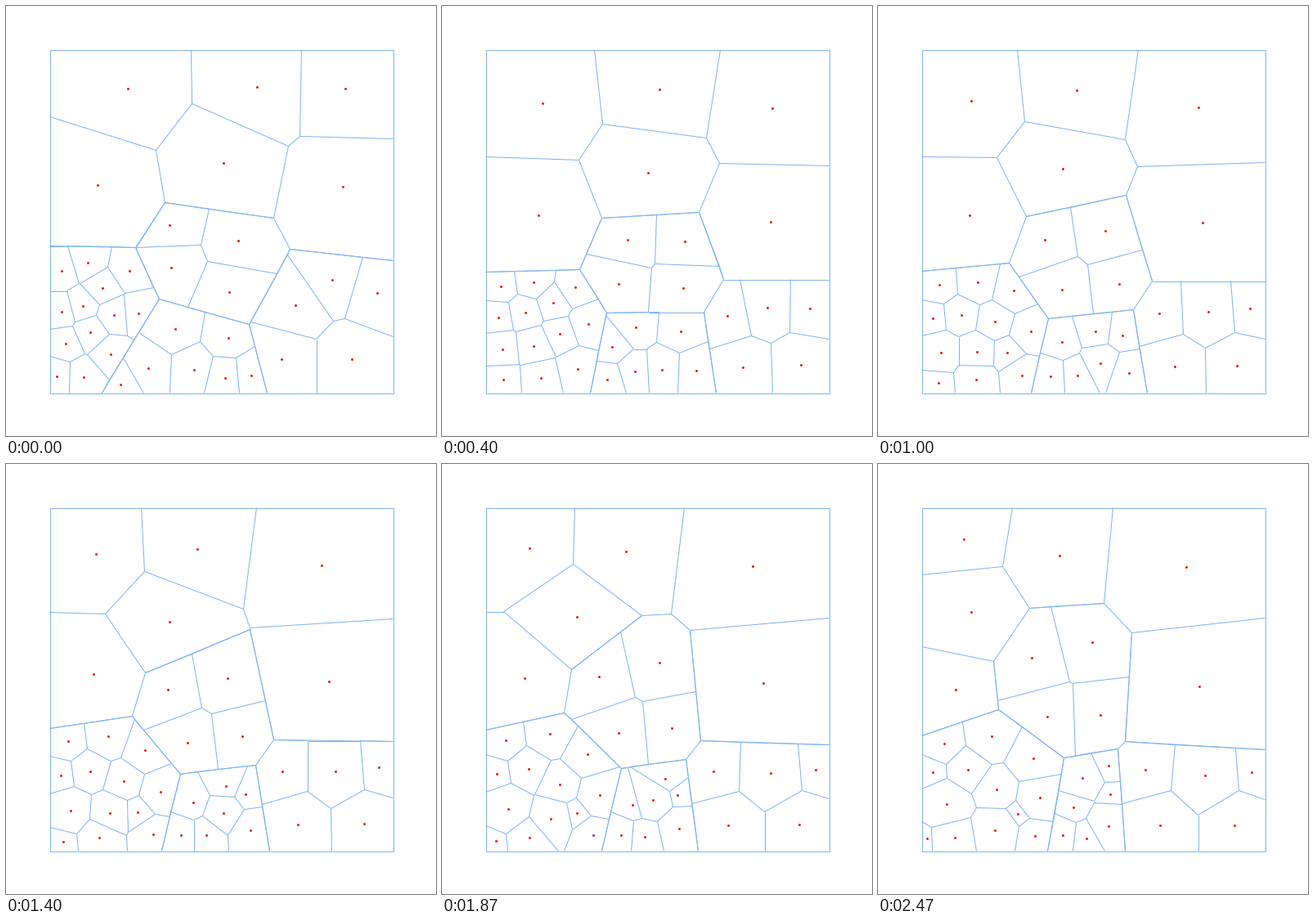
Animation of 526 by 526 pixels, one loop 2.54 s. Source, as a matplotlib script:

```python
import numpy as np
import matplotlib.pyplot as plt
from matplotlib.animation import FuncAnimation
from matplotlib.collections import LineCollection

SIZE, DPI = 526, 100
PX = 72 / DPI
LOOP_MS, TICK_MS = 2540, 20
POSES, POSE_MS = 38, 1000 / 15
STEPS = 2                      # relaxation steps per pose
BOX = [(53, 53), (473, 53), (473, 473), (53, 473)]

# Each site: where it starts and where it comes to rest (x, y, x, y).
# The last four top-level cells are divided again.
TOP = [(148, 100, 104, 91), (306, 98, 221, 111), (414, 100, 376, 125),
       (111, 218, 94, 275), (265, 191, 113, 180), (411, 220, 392, 271),
       (248, 307, 232, 261), (393, 386, 384, 408),
       (212, 433, 258, 417), (108, 370, 134, 395)]
MIDDLE = [(199, 267, 187, 236), (283, 286, 261, 217),
          (201, 319, 206, 308), (272, 349, 271, 306)]
RIGHT = [(398, 334, 399, 380), (453, 350, 456, 376), (353, 365, 326, 373),
         (336, 431, 344, 441), (422, 431, 435, 441)]
BOTTOM = [(206, 394, 281, 368), (271, 405, 283, 403), (173, 442, 238, 419),
          (229, 444, 254, 457), (267, 454, 249, 383), (299, 451, 281, 442),
          (139, 462, 225, 453)]
LEFT = [(67, 323, 80, 341), (99, 313, 138, 332), (150, 323, 189, 359),
        (117, 344, 144, 397), (67, 373, 66, 376), (93, 366, 109, 373),
        (131, 377, 170, 427), (161, 375, 197, 407), (72, 412, 83, 415),
        (102, 398, 142, 447), (127, 425, 191, 454), (61, 452, 59, 457),
        (94, 453, 93, 456)]
PLAIN = len(TOP) - 4


def clip(poly, a, b, c):
    """Part of a convex polygon where a*x + b*y <= c."""
    d = [a * x + b * y - c for x, y in poly]
    if not d or max(d) <= 0:
        return poly
    out = []
    for i, (x, y) in enumerate(poly):
        (px, py), e, f = poly[i - 1], d[i - 1], d[i]
        if (e <= 0) != (f <= 0):
            s = e / (e - f)
            out.append((px + s * (x - px), py + s * (y - py)))
        if f <= 0:
            out.append((x, y))
    return out


def power_cells(sites, weights, region):
    pts = [(x, y, x * x + y * y - w)
           for (x, y), w in zip(sites.tolist(), weights.tolist())]
    cells = []
    for i, (x, y, q) in enumerate(pts):
        poly = region
        for j, (u, v, r) in enumerate(pts):
            if j != i:
                poly = clip(poly, 2 * (u - x), 2 * (v - y), r - q)
        cells.append(poly)
    return cells


def centroid(poly, default):
    if len(poly) < 3:
        return default
    ox, oy = poly[0]
    area = sx = sy = 0
    for (x, y), (u, v) in zip(poly[1:], poly[2:]):
        x, y, u, v = x - ox, y - oy, u - ox, v - oy
        cross = x * v - u * y
        area += cross
        sx += cross * (x + u)
        sy += cross * (y + v)
    if abs(area) < 1e-6:
        return default
    return ox + sx / (3 * area), oy + sy / (3 * area)


def fit_weights(sites, region):
    """Weights that put every site on its cell's centroid (Gauss-Newton)."""
    n = len(sites)
    unit = np.ptp(sites, axis=0).max() / n ** 0.5

    def miss(u):
        found = [centroid(c, (1000, 1000))
                 for c in power_cells(sites, u * unit, region)]
        return np.append((np.array(found) - sites).ravel(), 0.01 * u)

    u, eye, h = np.zeros(n), np.eye(n), 0.2
    res = miss(u)
    for _ in range(8):
        jac = np.column_stack([(miss(u + h * e) - res) / h for e in eye])
        step = np.linalg.solve(jac.T @ jac + 0.01 * eye, -jac.T @ res)
        cost = res @ res
        for scale in (1, 0.5, 0.25, 0.1):
            trial = miss(u + scale * step)
            if trial @ trial < cost:
                u, res = u + scale * step, trial
                break
        if res @ res > 0.995 * cost:
            break
    return u * unit


class Diagram:
    """Sites that relax to their centroids while the weights grow."""

    def __init__(self, keys, region):
        keys = np.array(keys, float)
        self.sites, self.rest = keys[:, :2], keys[:, 2:]
        self.weights = fit_weights(self.rest, region)

    def relax(self, u, region):
        cells = power_cells(self.sites, u * self.weights, region)
        self.sites = np.array([centroid(c, tuple(s))
                               for c, s in zip(cells, self.sites)])
        return cells

    def shown(self, u):
        return self.sites + u * u * (self.rest - self.sites)

    def cells(self, u, region):
        return power_cells(self.shown(u), u * self.weights, region)


top = Diagram(TOP, BOX)
rest_cells = power_cells(top.rest, top.weights, BOX)
groups = [Diagram(keys, region) for keys, region
          in zip((MIDDLE, RIGHT, BOTTOM, LEFT), rest_cells[PLAIN:])]


def relax_all(u):
    for group, region in zip(groups, top.relax(u, BOX)[PLAIN:]):
        group.relax(u, region)


def pixel_edges(polys):
    """Every edge once, with its ends on whole pixels."""
    edges = set()
    for poly in polys:
        ends = [(round(x), round(y)) for x, y in poly]
        edges |= {tuple(sorted(e)) for e in zip(ends, ends[1:] + ends[:1])}
    return sorted(e for e in edges if e[0] != e[1])


def pose(u):
    cells = top.cells(u, BOX)
    polys, dots = cells[:PLAIN], [top.shown(u)[:PLAIN]]
    for group, region in zip(groups, cells[PLAIN:]):
        polys = polys + group.cells(u, region)
        dots.append(group.shown(u))
    return pixel_edges(polys), np.round(np.vstack(dots))


poses = []
for n in range(POSES):
    poses.append(pose(n / (POSES - 1)))
    for k in range(STEPS):
        relax_all((n + k / STEPS) / (POSES - 1))

fig = plt.figure(figsize=(SIZE / DPI, SIZE / DPI), dpi=DPI, facecolor="white")
ax = fig.add_axes([0, 0, 1, 1])
ax.set_xlim(-0.5, SIZE - 0.5)
ax.set_ylim(SIZE - 0.5, -0.5)
ax.axis("off")

lines = LineCollection([], colors="#7fb3f0", linewidths=PX)
ax.add_collection(lines)
marks = ax.scatter([], [], s=(3 * PX) ** 2, color="#e02020", linewidths=0,
                   zorder=3)


def draw(i):
    n = int((i + 0.5) * TICK_MS / POSE_MS)
    edges, dots = poses[min(n, POSES - 1)]
    lines.set_segments(edges)
    marks.set_offsets(dots)
    return lines, marks


anim = FuncAnimation(fig, draw, frames=LOOP_MS // TICK_MS, interval=TICK_MS,
                     repeat=True, repeat_delay=0)
plt.show()
```
